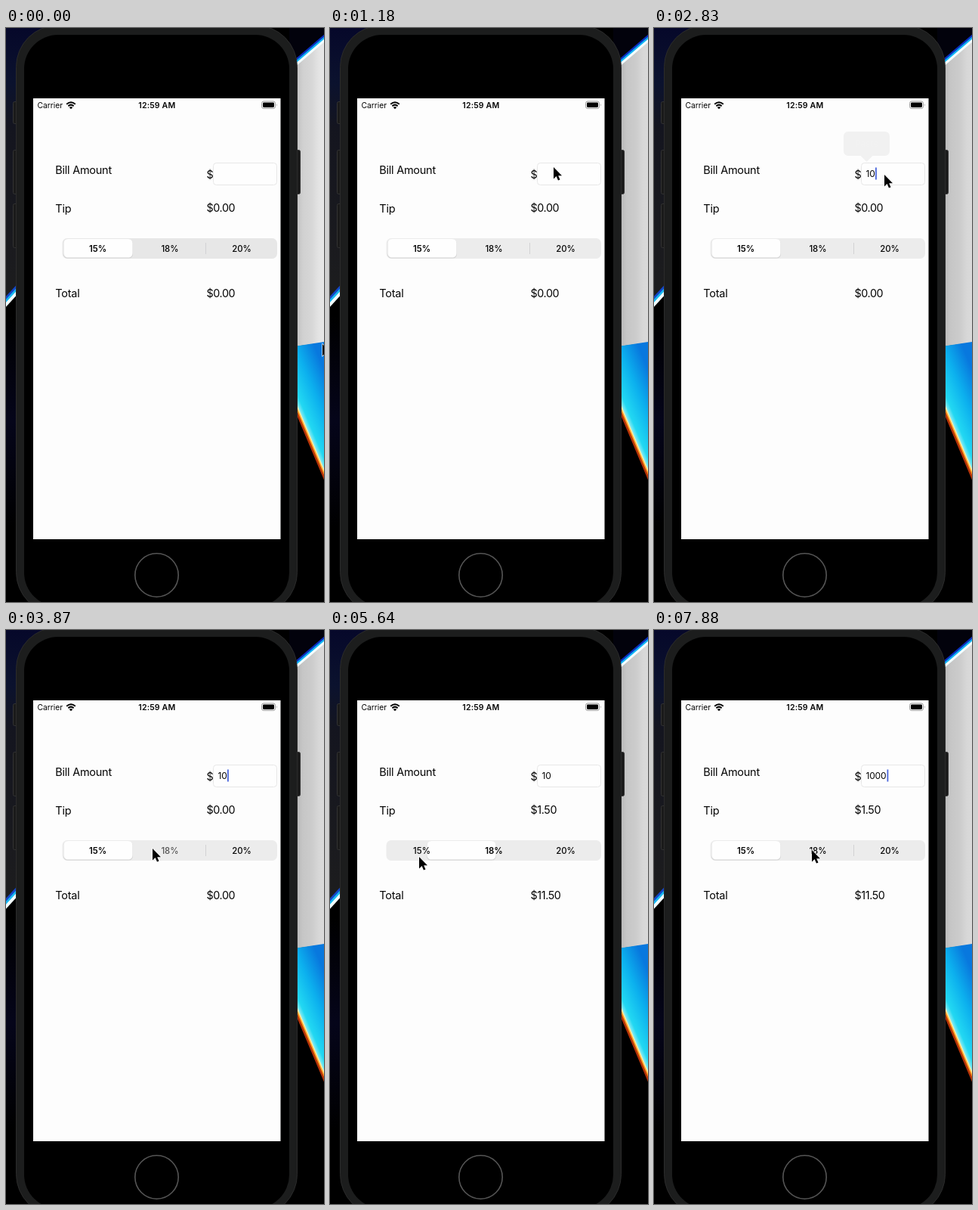
These frames come from a looping animation (421x759 px, 8000 ms). An HTML page:

```html
<!DOCTYPE html>
<html lang="en">
<head>
<meta charset="utf-8">
<title>Tip calculator</title>
<style>
html, body { margin: 0; width: 100%; height: 100%; overflow: hidden; background: #000; }
svg { display: block; width: 421px; height: 759px; }
text { font-family: Inter, Roboto, "Liberation Sans", sans-serif; fill: #050505; }
.label { font-size: 14.5px; letter-spacing: -.25px; }
.money { font-size: 14.3px; letter-spacing: -.4px; }
.seg { font-size: 11.4px; font-weight: 500; text-anchor: middle; }
.status { font-size: 10.3px; }
.clock { font-size: 10.6px; font-weight: 600; letter-spacing: .15px; text-anchor: middle; }
</style>
</head>
<body>
<svg viewBox="0 0 421 759">
  <defs>
    <linearGradient id="leftGlow" x2="0" y2="1">
      <stop offset="0" stop-color="#06082a"/><stop offset=".2" stop-color="#0b122e"/>
      <stop offset=".36" stop-color="#14151f"/><stop offset="1" stop-color="#1d1d1e"/>
    </linearGradient>
    <linearGradient id="lowGlow" x2="0" y2="1">
      <stop offset="0" stop-color="#000"/><stop offset=".5" stop-color="#05051a"/><stop offset="1" stop-color="#000"/>
    </linearGradient>
    <linearGradient id="shade">
      <stop offset="0" stop-color="#777" stop-opacity=".32"/><stop offset=".2" stop-color="#777" stop-opacity=".2"/>
      <stop offset=".55" stop-color="#777" stop-opacity=".14"/><stop offset=".8" stop-color="#777" stop-opacity=".03"/>
      <stop offset="1" stop-color="#777" stop-opacity="0"/>
    </linearGradient>
    <linearGradient id="blue" gradientUnits="userSpaceOnUse" x1="359" y1="442" x2="421" y2="416">
      <stop offset="0" stop-color="#b8f6f4"/><stop offset=".12" stop-color="#22d8f2"/>
      <stop offset=".45" stop-color="#0cb0ee"/><stop offset=".8" stop-color="#0878de"/>
    </linearGradient>
  </defs>

  <rect width="421" height="759"/>
  <path d="M0 0H60V300L0 364Z" fill="url(#leftGlow)"/>
  <rect y="380" width="40" height="280" fill="url(#lowGlow)"/>
  <g fill="none" stroke-width="4">
    <path d="M-2 360L20 336" stroke="#1446c8"/>
    <path d="M-2 364L20 340" stroke="#18b8f0"/>
    <path d="M-2 368L20 344" stroke="#f2feff"/>
  </g>

  <path d="M375 0H421V12L375 53Z" fill="#02020c"/>
  <path id="wall" d="M375 52L421 13V416L375 422Z"/>
  <path d="M386 43L421 13V416L386 421Z" fill="url(#shade)"/>
  <g fill="none" stroke-width="3">
    <path d="M375 50L423 9" stroke="#0b2fc0"/>
    <path d="M375 53L423 12" stroke="#10b4f4"/>
    <path d="M375 56L423 15" stroke="#f4ffff"/>
  </g>
  <path d="M375 422L421 415V590L375 480Z" fill="url(#blue)"/>
  <g fill="none" stroke-width="2.6">
    <path d="M375 477L423 591" stroke="#ffe9a0"/>
    <path d="M375 481L423 595" stroke="#ff9a1c"/>
    <path d="M375 485L423 599" stroke="#b83408"/>
  </g>

  <g fill="#1a1a1a" stroke="#333">
    <rect x="9.5" y="97.5" width="8" height="29" rx="2"/>
    <rect x="9.5" y="161.5" width="8" height="58" rx="2"/>
    <rect x="9.5" y="232.5" width="8" height="58" rx="2"/>
    <rect x="381.5" y="161.5" width="8" height="58" rx="2"/>
    <rect x="13.5" y="-3.5" width="372" height="778" rx="55" fill="#1c1d1d" stroke="#2b2b2b"/>
  </g>
  <rect x="24" y="9" width="351" height="756" rx="45"/>
  <circle cx="199.5" cy="723.5" r="28.7" fill="none" stroke="#555" stroke-width="1.6"/>
  <rect x="36" y="93" width="327.5" height="583" fill="#fdfdfd"/>

  <text class="status" x="41.5" y="106">Carrier</text>
  <g fill="none" stroke="#000" stroke-width="2">
    <path d="M80.2 100.8Q86 95.6 91.8 100.8"/>
    <path d="M82.4 103.2Q86 100 89.6 103.2"/>
  </g>
  <path d="M86 107.2L83.8 104.9Q86 103.2 88.2 104.9Z"/>
  <text class="clock" x="199.8" y="106">12:59 AM</text>
  <rect x="338.5" y="97" width="18" height="9.4" rx="2.6" fill="none" stroke="#999"/>
  <rect x="340" y="98.4" width="15" height="6.6" rx="1.4"/>
  <path d="M358 100.2q1.6 1.5 0 3Z" fill="#999"/>

  <text class="label" x="65.3" y="192.5">Bill Amount</text>
  <text class="label" x="65.3" y="244">Tip</text>
  <text class="label" x="65.3" y="356">Total</text>
  <text class="money" x="265.6" y="198.5">$</text>
  <text class="money" id="tip" x="265.6" y="243.3"></text>
  <text class="money" id="total" x="265.6" y="356"></text>

  <rect x="274.5" y="178.5" width="84" height="29" rx="4" fill="#fefefe" stroke="#e7e7e7"/>
  <text id="bill" x="280.5" y="197.2" font-size="12" letter-spacing="-.2"></text>
  <rect id="caret" y="184.5" width="1.8" height="16" fill="#4a66dc"/>

  <rect id="track" x="74.5" y="278" width="284.5" height="27" rx="6.5"/>
  <path id="sep1" d="M169.5 284V299" stroke="#d2d2d4"/>
  <path id="sep2" d="M264.5 284V299" stroke="#d2d2d4"/>
  <g id="knob">
    <rect y="279.6" width="92" height="25" rx="5.5" fill="#d2d2d2"/>
    <rect x=".4" y="279" width="91.2" height="24.6" rx="5.5" fill="#fefefe"/>
  </g>
  <text class="seg" id="seg15" x="121.5" y="295.6">15%</text>
  <text class="seg" id="seg18" x="217" y="295.6">18%</text>
  <text class="seg" id="seg20" x="312" y="295.6">20%</text>

  <g id="popup">
    <path d="M257 137H306a6 6 0 0 1 6 6V163a6 6 0 0 1 -6 6H289.5L281.5 177L273.5 169H257a6 6 0 0 1 -6 -6V143a6 6 0 0 1 6 -6Z" fill="#222"/>
    <text id="paste" x="281.5" y="157" font-size="12" text-anchor="middle" style="fill:#fff">Paste</text>
  </g>

  <path id="cursor" d="M0 0V15.4L3.6 12.1L6 17.6L8.5 16.5L6.2 11.2H11Z" stroke="#fff" stroke-width="1.3" paint-order="stroke"/>
</svg>
<script>
const LOOP = 8000, START = 285, STEP = 148.6;
const $ = id => document.getElementById(id);
const set = (id, attrs) => { for (const a in attrs) $(id).setAttribute(a, attrs[a]); };

// Each key holds a step number followed by its values; step -1 is the opening pause.
const pointer = [
  [-1, 419, 418], [6, 296, 184], [7, 296, 184], [10, 305, 194], [20, 305, 194],
  [24, 194, 289], [26, 203, 292], [28, 250, 290], [30, 312, 285], [31, 322, 283],
  [32, 322, 284], [35, 120, 299], [36, 118, 300], [40, 311, 192], [47, 311, 192], [51, 209, 291]
];
const slide = [[24, 76], [25, 122], [26, 171], [30, 171], [31, 214], [32, 266], [35, 266], [36, 128], [37, 76]];
const popup = [[12, 0], [13, .21], [14, 1], [15, 1], [16, .4], [17, .05], [18, 0]];
const bills = [[-1, ""], [16, "1"], [17, "10"], [43, "100"], [45, "1000"]];
const tips = [[-1, 0], [25, 1.8], [31, 2], [36, 1.5]];
const caretX = [281, 287, 293, 300.5, 308.5];

function tween(keys, k) {
  if (k <= keys[0][0]) return keys[0].slice(1);
  const i = keys.findIndex(key => key[0] >= k);
  if (i < 0) return keys.at(-1).slice(1);
  const a = keys[i - 1], b = keys[i];
  const u = (k - a[0]) / (b[0] - a[0]), e = u * u * (3 - 2 * u);
  return a.slice(1).map((v, j) => v + (b[j + 1] - v) * e);
}
const hold = (keys, k) => keys.findLast(key => key[0] <= k)[1];

function draw(k) {
  const [x, y] = tween(pointer, k), [knob] = tween(slide, k), [alpha] = tween(popup, k);
  const bill = hold(bills, k), tip = hold(tips, k);
  // Every edit restarts the caret's blink.
  const blinkStart = k < 16 ? 10 : k < 43 ? 17 : 44;

  set("wall", { fill: k < 0 ? "#e7e7e7" : "#dadada" });
  set("track", { fill: k < 0 ? "#e7e7e7" : "#ececec" });
  set("cursor", { transform: `translate(${x} ${y})` });
  set("knob", { transform: `translate(${knob} 0)` });
  set("sep1", { opacity: knob > 240 ? 1 : 0 });
  set("sep2", { opacity: knob < 100 ? 1 : 0 });
  set("popup", { opacity: alpha });
  set("paste", { opacity: alpha < .5 ? .12 : 1 });
  set("caret", { x: caretX[bill.length], opacity: k >= 9 && (k - blinkStart) % 7 < 4 ? 1 : 0 });
  set("seg15", { opacity: k === 35 ? .65 : 1 });
  set("seg18", { opacity: k === 24 ? .65 : 1 });
  ["seg15", "seg18", "seg20"].forEach((id, i) => {
    $(id).style.fontWeight = Math.abs(knob - 76 - 95 * i) < 46 ? 600 : 500;
  });
  $("bill").textContent = bill;
  $("tip").textContent = "$" + tip.toFixed(2);
  $("total").textContent = "$" + (tip && 10 + tip).toFixed(2);
}

function tick() {
  const t = performance.now() % LOOP;
  draw(Math.max(-1, Math.floor((t - START) / STEP)));
  requestAnimationFrame(tick);
}
tick();
</script>
</body>
</html>
```
